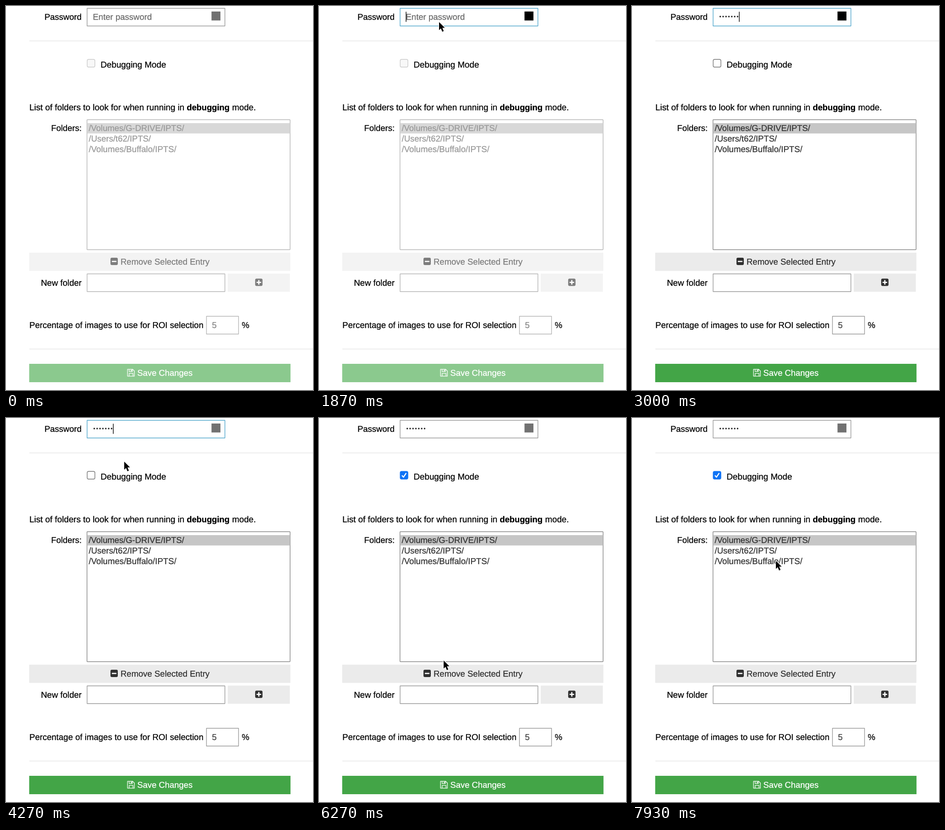
Animation of 670x836 px, one loop 8 s. Source, as an HTML page with a canvas:

```html
<!DOCTYPE html>
<html lang="en">
<head>
<meta charset="utf-8">
<title>Settings form</title>
<style>
html, body { margin: 0; width: 100%; height: 100%; overflow: hidden; background: #fff; }
canvas { display: block; }
</style>
</head>
<body>
<canvas id="stage" width="670" height="836"></canvas>
<script>
const ctx = document.getElementById("stage").getContext("2d");
ctx.textRendering = "geometricPrecision";
const LOOP = 8000, FPS = 15;

const easeOut = u => 1 - (1 - u) * (1 - u);
const easeInOut = u => u * u * (3 - 2 * u);
const linear = u => u;

// Pointer stops: [tick, x, y, easing used to reach the stop]
const PATH = [
  [3, 541, 218, linear],
  [11, 262, 35, easeOut],
  [62, 262, 35, linear],
  [63, 261, 70, linear],
  [64, 258, 95, linear],
  [70, 183, 124, easeOut],
  [73, 183, 124, linear],
  [77, 355, 256, easeInOut],
  [78, 355, 256, linear],
  [79, 346, 251, linear],
  [90, 254, 524, easeInOut],
  [91, 254, 524, linear],
  [94, 272, 528, easeInOut],
  [95, 274, 541, linear],
  [96, 274, 541, linear],
  [98, 266, 552, linear],
  [110, 266, 552, linear],
  [119, 314, 311, easeInOut]
];
const KEYSTROKES = [32, 35, 38, 40, 41, 43, 44];
const CARET_OFF = [[21, 28], [52, 59], [66, 73]];
const DOT_PITCH = 6.3;

const within = (tick, from, to) => tick >= from && tick < to;

function pointerAt(tick) {
  const next = PATH.findIndex(stop => stop[0] >= tick);
  if (next <= 0) return { x: PATH[0][1], y: PATH[0][2] };
  const [t0, x0, y0] = PATH[next - 1];
  const [t1, x1, y1, ease] = PATH[next];
  const u = ease((tick - t0) / (t1 - t0));
  return { x: x0 + (x1 - x0) * u, y: y0 + (y1 - y0) * u };
}

function fillRect(x, y, w, h, color) {
  ctx.fillStyle = color;
  ctx.fillRect(x, y, w, h);
}

function box(x, y, w, h, border, fill = "#fff", radius = 0) {
  ctx.beginPath();
  ctx.roundRect(x, y, w, h, radius);
  ctx.fillStyle = fill;
  ctx.fill();
  ctx.strokeStyle = border;
  ctx.lineWidth = 1.4;
  ctx.stroke();
}

// A hairline stroke gives the slightly heavier weight of smoothed screen text.
function text(str, x, y, color = "#000", size = 18.5, align = "left", weight = "") {
  ctx.font = `${weight} ${size}px "Liberation Sans", Arial, sans-serif`;
  ctx.textAlign = align;
  ctx.fillStyle = ctx.strokeStyle = color;
  ctx.lineWidth = 0.3;
  ctx.lineJoin = "round";
  ctx.fillText(str, x, y);
  ctx.strokeText(str, x, y);
}

function line(points, color, width) {
  ctx.beginPath();
  points.forEach(([x, y]) => ctx.lineTo(x, y));
  ctx.strokeStyle = color;
  ctx.lineWidth = width;
  ctx.stroke();
}

function signIcon(x, y, color, plus) {
  ctx.beginPath();
  ctx.roundRect(x, y, 16, 16, 3);
  ctx.fillStyle = color;
  ctx.fill();
  fillRect(x + 3, y + 6.8, 10, 2.6, "#fff");
  if (plus) fillRect(x + 6.7, y + 3, 2.6, 10, "#fff");
}

function floppyIcon(x, y) {
  ctx.strokeStyle = "#fff";
  ctx.lineWidth = 1.3;
  ctx.beginPath();
  ctx.moveTo(x, y);
  ctx.lineTo(x + 11, y);
  ctx.lineTo(x + 15, y + 4);
  ctx.lineTo(x + 15, y + 15);
  ctx.lineTo(x, y + 15);
  ctx.closePath();
  ctx.rect(x + 3.5, y, 7, 5);
  ctx.rect(x + 3.5, y + 9, 8.5, 6);
  ctx.stroke();
  fillRect(x + 7.3, y + 1, 2, 3, "#fff");
}

function drawPassword(tick) {
  const focused = within(tick, 15, 73);
  const typed = KEYSTROKES.filter(k => tick >= k).length;
  text("Password", 165, 30, "#000", 18.45, "right");
  box(177, 5, 300.7, 38.5, focused ? "#51a7cc" : "#999");
  if (!typed) text("Enter password", 189.5, 30, "#6b6b6b", 18.55);
  ctx.fillStyle = "#222";
  for (let i = 0; i < typed; i++) {
    ctx.beginPath();
    ctx.arc(192.6 + DOT_PITCH * i, 23, 1.75, 0, 7);
    ctx.fill();
  }
  const hovered = within(tick, 13, 63);
  fillRect(448.5, 12, 19.5, 19.5, hovered ? "#000" : "#717171");
  const blinkedOff = CARET_OFF.some(([from, to]) => within(tick, from, to));
  if (focused && !blinkedOff) fillRect(189.3 + DOT_PITCH * typed, 12.5, 1.5, 22, "#111");
}

function drawCheckbox(tick, enabled) {
  const checked = tick >= 73;
  const border = checked ? "#0f73f5" : enabled ? "#767676" : "#cbcbcb";
  const fill = checked ? "#0f73f5" : enabled ? "#fff" : "#f8f8f8";
  box(177.2, 116.2, 16.8, 16.8, border, fill, 3);
  if (checked) line([[181, 125], [184.3, 128.8], [190.3, 119.8]], "#fff", 2.4);
  text("Debugging Mode", 206.5, 134, "#000", 18.75);
}

function drawFolders(enabled) {
  const ink = enabled ? "#333" : "#999";
  text("List of folders to look for when running in", 51, 226.5, "#000", 18.85);
  text("debugging", 394.5, 226.5, "#000", 18.3, "left", "bold");
  text("mode.", 493.5, 226.5, "#000", 18.7);
  text("Folders:", 165, 272, "#000", 18.4, "right");
  box(176.7, 247.5, 443.3, 283, enabled ? "#868686" : "#b5b5b5", "#fff", 1);
  fillRect(177.5, 255, 442, 22.5, enabled ? "#c6c6c6" : "#d8d8d8");
  text("/Volumes/G-DRIVE/IPTS/", 180.5, 272, ink, 18.4);
  text("/Users/t62/IPTS/", 180.5, 294.7, ink, 18.5);
  text("/Volumes/Buffalo/IPTS/", 180.5, 317.5, ink, 18.65);
}

function drawButtons(enabled, hovered) {
  const face = enabled ? "#ebebeb" : "#f3f3f3";
  const ink = enabled ? "#303030" : "#7d7d7d";
  ctx.save();
  if (hovered) {
    ctx.shadowColor = "rgba(0,0,0,.3)";
    ctx.shadowOffsetY = 2;
    ctx.shadowBlur = 4;
  }
  fillRect(50.6, 537, 570, 39.7, face);
  ctx.restore();
  signIcon(228, 548, ink, false);
  text("Remove Selected Entry", 250, 562.5, ink, 18.5);

  text("New folder", 165, 609, "#000", 18.6, "right");
  box(177, 583.2, 300.7, 38.6, enabled ? "#999" : "#b5b5b5");
  fillRect(484, 582.5, 135.5, 39.7, face);
  signIcon(543.8, 593.6, ink, true);

  text("Percentage of images to use for ROI selection", 51, 700.5, "#000", 18.58);
  box(437.5, 675.5, 70, 38.7, enabled ? "#999" : "#b5b5b5");
  text("5", 449.5, 700.5, enabled ? "#444" : "#888", 18.5);
  text("%", 514.5, 700.5, "#000", 18.5);

  fillRect(50.6, 779, 570.3, 40, enabled ? "#43a547" : "#8bc98e");
  floppyIcon(265.2, 790.8);
  text("Save Changes", 286.5, 804.5, "#fff", 18.4);
}

function drawPointer({ x, y }) {
  const outline = [[0, 0], [0, 17.5], [4, 13.8], [7, 21], [10.2, 19.6], [7.2, 12.6], [12.6, 12.4]];
  ctx.beginPath();
  outline.forEach(([dx, dy]) => ctx.lineTo(x + dx, y + dy));
  ctx.closePath();
  ctx.lineJoin = "round";
  ctx.lineWidth = 2.6;
  ctx.strokeStyle = "#fff";
  ctx.stroke();
  ctx.fillStyle = "#000";
  ctx.fill();
}

function draw(tick) {
  const enabled = tick >= 45;
  const pointer = pointerAt(tick);
  const overRemove = tick >= 90 && pointer.y >= 537;
  fillRect(0, 0, 670, 836, "#fff");
  fillRect(51, 75.3, 619, 1.4, "#e6e6e6");
  fillRect(51, 746, 619, 1.4, "#e6e6e6");
  drawPassword(tick);
  drawCheckbox(tick, enabled);
  drawFolders(enabled);
  drawButtons(enabled, overRemove);
  if (within(tick, 3, 32) || tick >= 63) drawPointer(pointer);
}

const start = performance.now();
function loop() {
  const elapsed = (performance.now() - start) % LOOP;
  draw(Math.floor((elapsed + 4) * FPS / 1000) % (LOOP * FPS / 1000));
  requestAnimationFrame(loop);
}
loop();
</script>
</body>
</html>
```
